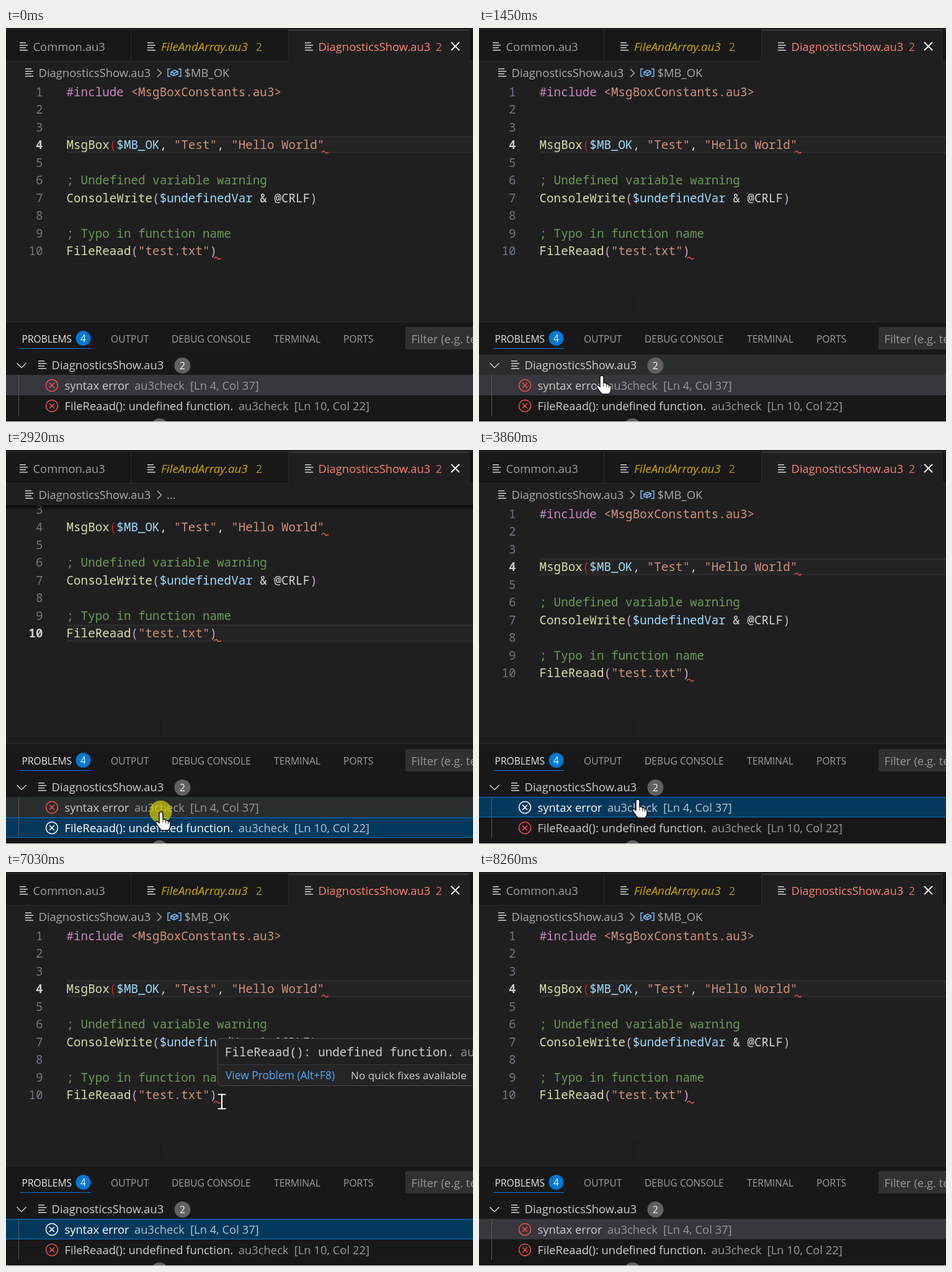
An HTML page with a canvas for the animation above (8330 ms loop, 753 by 635 pixels).

```html
<!DOCTYPE html>
<html lang="en">
<head>
<meta charset="utf-8">
<title>Diagnostics in the editor</title>
<style>
  html, body { margin: 0; width: 100%; height: 100%; overflow: hidden; background: #1f1f1f; }
  canvas { display: block; }
</style>
</head>
<body>
<canvas id="stage" width="753" height="635"></canvas>
<script>
const ctx = document.getElementById('stage').getContext('2d');
const W = 753, H = 635, LOOP = 8330;
const UI = '"Open Sans", "Noto Sans", sans-serif';
const MONO = '19.25px "Noto Sans Mono", "DejaVu Sans Mono", monospace';
const CHAR = 11.55, LINE = 28.5, CODE_X = 97.5, EDITOR_TOP = 89, PANEL_TOP = 473;
const ROW = 33, LIST_TOP = 526;

const FN = '#dcdcaa', STR = '#ce9178', VAR = '#9cdcfe', TXT = '#d4d4d4',
      COMMENT = '#6a9955', PAREN = '#d0a4d6', BAD = '#d21e1e', ERR = '#f14c4c';

// Each line is a run of colour, text pairs.
const code = [
  ['#c586c0', '#include ', STR, '<MsgBoxConstants.au3>'],
  [],
  [],
  [FN, 'MsgBox', BAD, '(', VAR, '$MB_OK', TXT, ', ', STR, '"Test"', TXT, ', ', STR, '"Hello World"'],
  [],
  [COMMENT, '; Undefined variable warning'],
  [FN, 'ConsoleWrite', PAREN, '(', VAR, '$undefinedVar', TXT, ' & @CRLF', PAREN, ')'],
  [],
  [COMMENT, '; Typo in function name'],
  [FN, 'FileReaad', PAREN, '(', STR, '"test.txt"', PAREN, ')'],
];

// Mouse moves: start, end, positions at even steps.
const moves = [
  [260, 550, [[256, 606], [252, 545], [249, 447], [247, 330], [246, 258]]],
  [750, 1520, [[246, 252], [246, 240], [246, 236], [246, 250], [247, 290], [248, 345],
               [249, 400], [249, 447], [238, 495], [214, 540], [198, 562], [194, 590]]],
  [1590, 1800, [[193, 593], [192, 597], [192, 600], [192, 602]]],
  [2530, 2720, [[206, 599], [226, 594], [243, 587], [250, 585]]],
  [3860, 4420, [[256, 565], [280, 515], [325, 470], [365, 440], [386, 415],
                [378, 395], [362, 380], [349, 370], [344.5, 366.5]]],
  [7030, 7730, [[348, 370], [365, 385], [400, 415], [440, 458], [485, 505], [525, 545],
                [556, 573], [582, 595], [605, 617], [620, 680], [620, 680]]],
];

function mouseAt(t) {
  let pos = [0, 900];
  for (const [start, end, points] of moves) {
    if (t < start) break;
    const last = points.length - 1;
    pos = points[Math.min(last, Math.floor((t - start) / (end - start) * last + 0.01))];
  }
  return pos;
}

function rect(x, y, w, h, color) {
  ctx.fillStyle = color;
  ctx.fillRect(x, y, w, h);
}

function disc(x, y, r, color) {
  ctx.fillStyle = color;
  ctx.beginPath();
  ctx.arc(x, y, r, 0, 7);
  ctx.fill();
}

function line(d, color, width = 1.5) {
  ctx.strokeStyle = color;
  ctx.lineWidth = width;
  ctx.stroke(new Path2D(d));
}

function text(str, x, y, color, size = 18.4, style = '') {
  ctx.font = `${style} ${size}px ${UI}`;
  ctx.fillStyle = color;
  ctx.fillText(str, x, y);
}

function mono(str, x, y, color, weight = '500') {
  ctx.font = `${weight} ${MONO}`;
  ctx.fillStyle = color;
  ctx.fillText(str, x, y);
}

function badge(label, x, y, r, color) {
  disc(x, y, r, color);
  ctx.textAlign = 'center';
  text(label, x, y + 5.5, '#f8f8f8', 15.6);
  ctx.textAlign = 'left';
}

function fileIcon(x, y) {
  [10, 13, 10, 13].forEach((w, i) => rect(x, y - 7 + i * 4, w, 1.5, '#d0d4d4'));
}

function drawTabs() {
  rect(0, 0, W, 54, '#181818');
  rect(0, 2, W, 1, '#2b2b2b');
  rect(0, 53, W, 1, '#2b2b2b');
  rect(456, 3, 290, 52, '#1f1f1f');
  rect(456, 3, 290, 1, '#4a4a4a');
  for (const x of [201, 455, 746]) rect(x, 3, 1, 51, '#2b2b2b');
  fileIcon(22, 30);
  text('Common.au3', 43.5, 37, '#9d9d9d');
  fileIcon(228, 30);
  text('FileAndArray.au3', 250, 37, '#cca700', 18.8, 'italic');
  text('2', 403, 36.5, '#a88e1c', 17.4);
  fileIcon(482, 30);
  text('DiagnosticsShow.au3', 503.5, 37, '#f88070');
  text('2', 693, 36.5, '#d0705f', 17.4);
  line('M718 23l13 13m0 -13l-13 13', '#fff', 1.8);
}

function drawBreadcrumb(collapsed) {
  rect(0, 54, W, EDITOR_TOP - 54, '#1f1f1f');
  fileIcon(31, 72);
  text('DiagnosticsShow.au3', 52.5, 79, '#a9a9a9');
  line('M244 66l6.5 6.5l-6.5 6.5', '#a9a9a9');
  if (collapsed) {
    text('...', 259, 79, '#a9a9a9');
  } else {
    line('M265 66h-4v12h4M278 66h4v12h-4M266 71l6 -3l5 2v4l-6 3l-5 -2zl5 2l6 -3m-6 3v4', '#75beff');
    text('$MB_OK', 287.5, 79, '#a9a9a9');
  }
}

function drawEditor(scroll, current) {
  ctx.save();
  ctx.beginPath();
  ctx.rect(0, EDITOR_TOP, W, PANEL_TOP - EDITOR_TOP);
  ctx.clip();
  code.forEach((runs, i) => {
    const n = i + 1, mid = 103 + i * LINE - scroll, base = mid + 6.5;
    if (n === current) {
      rect(98, mid - 14.5, W, 28, '#2a2a2a');
      rect(98, mid - 11.5, W, 22, '#232323');
    }
    const label = String(n);
    mono(label, 59.5 - label.length * CHAR, base, n === current ? '#ccc' : '#6e7681', n === current ? 'bold' : '500');
    let x = CODE_X;
    for (let k = 0; k < runs.length; k += 2) {
      mono(runs[k + 1], x, base, runs[k]);
      x += runs[k + 1].length * CHAR;
    }
    if (n === 4 || n === 10) line(`M${x - 4.5} ${mid + 12}q3 -4 5.5 -.5t5.5 0`, scroll ? '#e0703c' : ERR);
  });
  if (scroll) {
    const shade = ctx.createLinearGradient(0, EDITOR_TOP, 0, EDITOR_TOP + 8);
    shade.addColorStop(0, '#000000b0');
    shade.addColorStop(1, '#00000000');
    rect(0, EDITOR_TOP, W, 8, shade);
  }
  ctx.restore();
}

function drawProblem(y, message, place, selected, focused, hovered) {
  const active = selected && focused;
  if (selected || hovered) rect(0, y, W, ROW, active ? '#04395e' : selected ? '#37373d' : '#2a2d2e');
  if (active) {
    rect(0, y, W, 1, '#0078d4');
    rect(0, y + ROW - 1, W, 1, '#0078d4');
  }
  rect(20, y, 1, ROW, '#585858');
  const mid = y + 17;
  line(`M64.5 ${mid}a9.5 9.5 0 1 1 19 0a9.5 9.5 0 1 1 -19 0M70 ${mid - 4}l8 8m0 -8l-8 8`, active ? '#fff' : ERR, 1.6);
  text(message, 94.5, mid + 6.5, active ? '#fff' : '#ccc');
  const x = 94.5 + ctx.measureText(message).width + 8.5;
  const dim = active ? '#b3c2cd' : '#989898';
  text('au3check', x, mid + 6.5, dim);
  text(place, x + 90, mid + 6.5, dim);
}

function drawPanel(selected, focused, hovered) {
  rect(0, PANEL_TOP, W, H - PANEL_TOP, '#181818');
  rect(0, PANEL_TOP, W, 1, '#2b2b2b');
  text('PROBLEMS', 25.5, 507, '#e7e7e7', 15.6);
  badge('4', 124.5, 500, 12, '#0078d4');
  rect(23, 516, 114, 1, '#0078d4');
  [['OUTPUT', 169], ['DEBUG CONSOLE', 267], ['TERMINAL', 432], ['PORTS', 544]]
    .forEach(([label, x]) => text(label, x, 507, '#9d9d9d', 15.6));
  ctx.fillStyle = '#313131';
  ctx.beginPath();
  ctx.roundRect(644, 482, 130, 36, 3);
  ctx.fill();
  text('Filter (e.g. text, **/*.ts)', 653.5, 508, '#989898');

  if (hovered === 0) rect(0, LIST_TOP, W, ROW, '#2a2d2e');
  line('M17.5 540l7.5 7.5l7.5 -7.5', '#ccc');
  fileIcon(52, 543);
  text('DiagnosticsShow.au3', 73.5, 549.5, '#ccc');
  badge('2', 284.5, 544, 13, '#616161');
  drawProblem(LIST_TOP + ROW, 'syntax error', '[Ln 4, Col 37]', selected === 1, focused, hovered === 1);
  drawProblem(LIST_TOP + 2 * ROW, 'FileReaad(): undefined function.', '[Ln 10, Col 22]', selected === 2, focused, hovered === 2);
  disc(247.5, 642, 13, '#616161');
}

function drawTooltip(alpha) {
  ctx.globalAlpha = alpha;
  ctx.beginPath();
  ctx.roundRect(341.5, 268.5, 440, 76, 4);
  ctx.fillStyle = '#202020';
  ctx.fill();
  rect(342, 310, W, 34, '#252526');
  rect(342, 310, W, 1, '#383838');
  ctx.strokeStyle = '#454545';
  ctx.lineWidth = 1;
  ctx.stroke();
  mono('FileReaad(): undefined function.', 353, 296.5, '#ccc');
  mono('au3check', 732.5, 296.5, '#8a8a8a');
  text('View Problem (Alt+F8)', 354, 334, '#4daafc', 17.4);
  text('No quick fixes available', 556, 334, '#ccc', 17.2);
  ctx.globalAlpha = 1;
}

const BEAM = 'M-6.5 -11.5h13M0 -11.5v23M-6.5 11.5h13';
const ARROW = new Path2D('M0 0V24L5.5 19L9 27L13 25.5L9.5 17.5H17Z');
const HAND = new Path2D('M-3 1Q-3 -2 0 -2Q3 -2 3 1V10Q7 9 7.5 12Q11 11 11.5 14Q15 13 15 17V21Q15 24 12 28H0L-8 17Q-9 13 -6 13.5L-3 16Z');

function drawMouse([x, y]) {
  ctx.save();
  ctx.translate(x, y);
  if (y < PANEL_TOP) {
    line(BEAM, '#111', 4.5);
    line(BEAM, '#fff', 2.2);
  } else {
    const shape = y < LIST_TOP ? ARROW : HAND;
    ctx.fillStyle = '#fff';
    ctx.strokeStyle = '#111';
    ctx.lineWidth = 1.5;
    ctx.fill(shape);
    ctx.stroke(shape);
    if (shape === HAND) line('M3 10v6M7.5 12v5M11.5 14v4', '#333', 1);
  }
  ctx.restore();
}

function draw(t) {
  const during = (a, b) => t >= a && t < b;
  const mouse = mouseAt(t);
  const hovered = Math.floor((mouseAt(t - 70)[1] - LIST_TOP) / ROW);
  const second = during(2390, 3050);

  rect(0, 0, W, H, '#1f1f1f');
  drawTabs();
  drawBreadcrumb(during(2530, 3180));
  drawEditor(second ? 64 : 0, second ? 10 : 4);
  if (t >= 470) {
    // faint beam left behind in the editor
    ctx.save();
    ctx.translate(249.5, 447.5);
    line('M-5 -11h10M0 -11v22M-5 11h10', '#181818', 1);
    ctx.restore();
  }
  drawPanel(second ? 2 : 1, during(2260, 8260), hovered);
  if (during(4620, 7100)) drawTooltip(Math.min(1, (Math.floor((t - 4620) / 70) + 1) / 3));
  if (during(2200, 2330) || during(2920, 3050)) disc(mouse[0] - 0.5, mouse[1] - 2, 18, 'rgba(215, 205, 0, .7)');
  drawMouse(mouse);
  rect(0, H - 1, W, 1, '#e0e0e0');
}

function tick() {
  draw(performance.now() % LOOP);
  requestAnimationFrame(tick);
}
tick();
</script>
</body>
</html>
```
